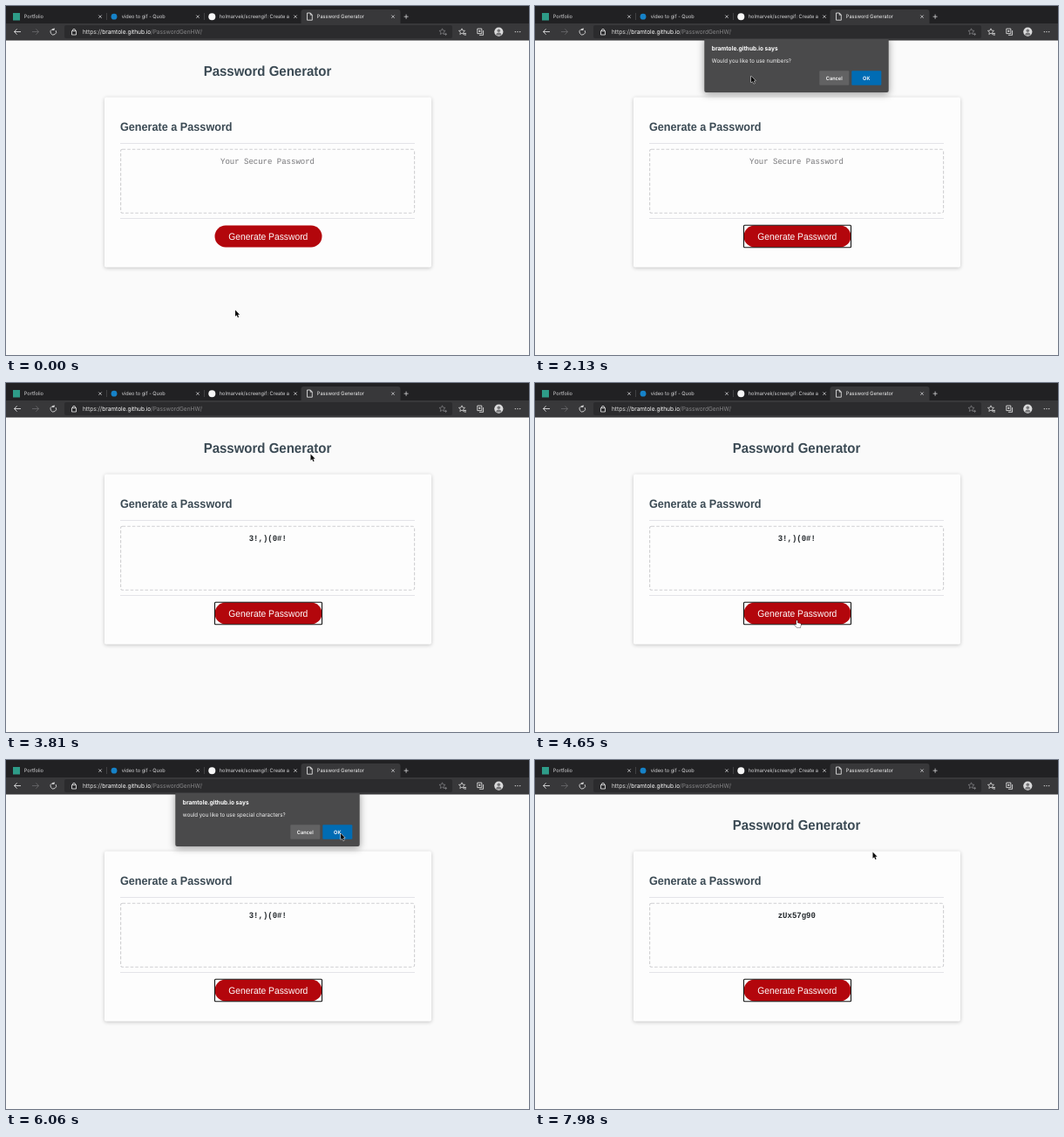
An HTML page with a canvas for the animation above (8 s loop, 600 by 400 pixels).

```html
<!DOCTYPE html>
<html lang="en">
<head>
<meta charset="utf-8">
<title>Password Generator</title>
<style>
  html, body { margin: 0; width: 100%; height: 100%; overflow: hidden; background: #fafafa; }
  canvas { display: block; width: 600px; height: 400px; }
</style>
</head>
<body>
<canvas id="stage"></canvas>
<script>
// A 1280 x 800 screen shown at 600 x 400
const SCALE = 600 / 1280;
const ASPECT = 16 / 15;
const UI = 'Inter, "Open Sans", sans-serif';
const PAGE = '"Liberation Sans", Arial, sans-serif';
const MONO = '"Liberation Mono", monospace';
const HOST = 'bramtole.github.io';
const INK = '#f0f0f0', FAINT = '#868688', SLATE = '#3b4a54';

const canvas = document.getElementById('stage');
const ctx = canvas.getContext('2d');
const ratio = window.devicePixelRatio || 1;
canvas.width = 600 * ratio;
canvas.height = 400 * ratio;

const SPOT = {
  rest: [263, 348.5], generate: [264.5, 257.5], again: [300.5, 272],
  field: [248, 80.5], ok: [384, 84], cancel: [349.5, 81.5], idle: [387.5, 105.5]
};
const ASK = {
  prompt: 'How many character would you like your password between 8 - 128',
  numbers: 'Would you like to use numbers?',
  special: 'would you like to use special characters?',
  lower: 'would you like to use Lowercase letters?',
  upper: 'would you like to use Uppercase letters?'
};

// The session is a chain of steps; in each the pointer goes to one spot.
const steps = [];
let loop = 0, spot = 'rest', result = '';

function addStep(length, target, dialog) {
  steps.push({ start: loop, length, from: SPOT[spot], to: SPOT[target], dialog, result });
  loop += length;
  spot = target;
}

function addRun(approach, button, typing, pace, answers, password) {
  addStep(approach, button);
  addStep(typing, 'field', 'prompt');
  for (const question in answers) addStep(pace, answers[question], question);
  result = password;
}

addRun(750, 'generate', 1200, 400,
  { numbers: 'ok', special: 'ok', lower: 'cancel', upper: 'cancel' }, '3!,)(0#!');
addRun(1190, 'again', 660, 450,
  { numbers: 'ok', special: 'cancel', lower: 'ok', upper: 'ok' }, 'zUx57g90');
addStep(800, 'idle');

// The pointer waits for half the step, then moves quickly and settles.
function pointerAt(step, u) {
  const k = Math.min(1, Math.max(0, (u - 0.5) / 0.2));
  const e = k * k * (3 - 2 * k);
  return step.from.map((a, i) => a + (step.to[i] - a) * e);
}

function box(x, y, w, h, r, fill, stroke, width = 1) {
  ctx.beginPath();
  ctx.roundRect(x, y, w, h, r);
  if (fill) { ctx.fillStyle = fill; ctx.fill(); }
  if (stroke) { ctx.strokeStyle = stroke; ctx.lineWidth = width; ctx.stroke(); }
}

function shadowBox(x, y, w, h, r, fill, shadow, blur, dy) {
  ctx.save();
  ctx.shadowColor = shadow;
  ctx.shadowBlur = blur * ratio;
  ctx.shadowOffsetY = dy * ratio;
  box(x, y, w, h, r, fill);
  ctx.restore();
}

function arc(x, y, r, fill, stroke, a = 0, b = Math.PI * 2) {
  ctx.beginPath();
  ctx.arc(x, y, r, a, b);
  if (fill) { ctx.fillStyle = fill; ctx.fill(); }
  if (stroke) { ctx.strokeStyle = stroke; ctx.lineWidth = 0.8; ctx.stroke(); }
}

function icon(d, x, y, stroke, fill, width = 0.8) {
  const shape = new Path2D(d);
  ctx.save();
  ctx.translate(x, y);
  ctx.lineJoin = 'round';
  ctx.lineWidth = width;
  ctx.strokeStyle = stroke;
  ctx.stroke(shape);
  if (fill) { ctx.fillStyle = fill; ctx.fill(shape); }
  ctx.restore();
}

// Size is in screen pixels; returns the right end of the text.
function text(str, x, y, size, family, color, { weight = 400, align = 'left' } = {}) {
  ctx.save();
  ctx.translate(x, y);
  ctx.scale(1, ASPECT);
  ctx.textRendering = 'geometricPrecision';
  ctx.font = `${weight} ${size * SCALE}px ${family}`;
  ctx.fillStyle = color;
  ctx.textAlign = align;
  ctx.fillText(str, 0, 0);
  const width = ctx.measureText(str).width;
  ctx.restore();
  return x + width;
}

function star(x, y, color) {
  ctx.beginPath();
  for (let i = 0; i < 10; i++) {
    const a = -Math.PI / 2 + i * Math.PI / 5, r = i % 2 ? 1.7 : 3.7;
    ctx.lineTo(x + r * Math.cos(a), y + r * Math.sin(a));
  }
  ctx.closePath();
  ctx.strokeStyle = color;
  ctx.lineWidth = 0.7;
  ctx.stroke();
}

function drawTabs() {
  const titles = ['Portfolio', 'video to gif - Quob', 'holmarvek/screengif: Create a', 'Password Generator'];
  box(338.5, 4, 114, 17, [3, 3, 0, 0], '#38383a');
  titles.forEach((title, i) => {
    const x = 112 * i;
    ctx.save();
    ctx.beginPath();
    ctx.rect(x, 4, 102, 16);
    ctx.clip();
    text(title, x + 20.8, 14.1, 12, UI, i === 3 ? INK : '#d4d4d6');
    ctx.restore();
    icon('M-1.7-1.7L1.7 1.7M1.7-1.7L-1.7 1.7', x + 108, 12.2, '#d4d4d6');
    if (i < 2) icon('M0 0V8', x + 115.5, 8, '#58585a', null, 0.6);
  });
  box(8, 8, 8, 8.5, 0, '#2e9c88');
  arc(124, 12.2, 3.4, '#1682c8');
  arc(236.3, 12.2, 4, '#f6f6f6');
  icon('M0 0H3.8L5.8 2.2V8.2H0ZM3.8 0V2.2H5.8', 345.5, 8, INK);
  icon('M-2.5 0H2.5M0-2.6V2.6', 459.1, 12.2, '#d4d4d6');
}

function drawToolbar() {
  const y = 29.5;
  box(67, 22, 445, 15, 2, '#2b2b2d');
  icon('M7.5 0H0M3.1-3.2L0 0L3.1 3.2', 9.5, y, INK);
  icon('M0 0H7.5M4.4-3.2L7.5 0L4.4 3.2', 30, y, '#6a6a6c');
  arc(54.3, 29.7, 3.3, null, INK, -0.5, Math.PI * 1.6);
  icon('M0 0V2H-2.2', 55.2, 25.4, INK);
  icon('M-2.5-.9H2.5V3.5H-2.5ZM-1.6-.9V-1.5A1.6 1.6 0 0 1 1.6-1.5V-.9', 78, y, INK);

  let x = text('https://', 88, 31.8, 14, UI, '#dcdcdc');
  x = text(HOST, x, 31.8, 14, UI, '#fbfbfb');
  text('/PasswordGenHW/', x, 31.8, 14, UI, FAINT);

  star(500.5, y, FAINT);
  icon('M-1.5 0H1.5M0-1.5V1.5', 504.5, 32.3, FAINT);
  star(523, y, INK);
  icon('M0 0H3M.5 1.6H3', 525, 31.4, INK);
  icon('M0 0H5V5.6H0ZM2.2 7.3H6.8V2M2.5 1.6V4M1.3 2.8H3.7', 540.8, 26, INK);
  arc(565.3, 29.6, 5.1, '#dadadb');
  arc(565.3, 28.3, 1.8, '#757577');
  arc(565.3, 33.6, 3.1, '#757577', null, Math.PI, 0);
  for (const dx of [-2.7, 0, 2.7]) arc(587 + dx, 29.6, 0.65, INK);
}

function drawBrowser() {
  box(0, 0, 600, 39.5, 0, '#38383a');
  box(0, 0, 600, 20, 0, '#212123');
  drawTabs();
  drawToolbar();
}

function drawPage(password, focused) {
  const center = { align: 'center' };
  box(0, 39, 600, 361, 0, '#fafafa');
  text('Password Generator', 300, 80.2, 32, PAGE, SLATE, { weight: 700, align: 'center' });
  shadowBox(113, 104.5, 375, 195, 2, '#fdfdfd', 'rgba(0,0,0,0.22)', 4, 1);
  text('Generate a Password', 131, 143.4, 27, PAGE, SLATE, { weight: 700 });
  for (const y of [157.5, 243.5]) icon('M0 0H338', 131, y, '#e4e4e8', null, 1);

  ctx.setLineDash([3.6, 2]);
  box(131.6, 164.3, 337, 73, 2, null, '#cfcfd2', 1.1);
  ctx.setLineDash([]);
  if (password) text(password, 300.3, 180.8, 19.2, MONO, '#252a2e', { weight: 700, align: 'center' });
  else text('Your Secure Password', 300, 180.8, 19.2, MONO, '#77777a', center);

  box(239.5, 251.5, 123, 25, 12.5, '#b3060c');
  text('Generate Password', 300.8, 268, 22, PAGE, '#ffffff', center);
  if (focused) box(239.5, 251.3, 123, 25.4, 1, null, '#141414', 1.1);
}

function drawDialog(kind, entry, px) {
  const prompt = kind === 'prompt';
  const bottom = prompt ? 126 : 99, top = bottom - 24.8;
  const label = { weight: 600, align: 'center' };
  ctx.save();
  ctx.beginPath();
  ctx.rect(0, 38, 600, 362);
  ctx.clip();
  shadowBox(194.3, 36, 211.4, bottom - 36, 2, '#4a4a4b', 'rgba(0,0,0,0.4)', 9, 2);
  ctx.restore();
  text(HOST + ' says', 202.8, 51.4, 14, UI, '#ffffff', { weight: 700 });
  text(ASK[kind], 202.8, 65, 13, UI, '#f4f4f4');
  if (prompt) {
    box(203, 71.5, 194, 12.5, 1, '#3b3b3c', '#a2a2a2', 0.9);
    text(entry, 206, 80.1, 13, UI, '#f8f8f8');
  }
  const hover = !prompt && px > 326 && px < 360;
  box(326.3, top, 34, 16.5, 1, hover ? '#767677' : '#626263');
  box(363.3, top, 34, 16.5, 1, '#006cb4');
  text('Cancel', 343.2, top + 10.4, 12, UI, '#f8f8f8', label);
  text('OK', 380.2, top + 10.4, 12, UI, '#ffffff', label);
}

function drawPointer(x, y, hand) {
  if (hand) {
    icon('M-.7 .4Q0-.5 .7 .4V3L4 3.8Q4.6 4 4.5 4.8L3.9 8.4H-.2L-2.4 5.3Q-2.2 4.3-.7 5.2Z',
      x, y, '#141414', '#fdfdfd');
  } else {
    icon('M0 0V7.2L1.7 5.7L2.9 8.5L4.1 8L2.9 5.2H5.1Z', x, y, '#f6f6f6', '#0a0a0a', 1);
  }
}

function draw(t) {
  const step = steps.findLast(s => s.start <= t);
  const u = (t - step.start) / step.length;
  const [x, y] = pointerAt(step, u);
  const overButton = x > 239 && x < 363 && y > 251 && y < 277;
  ctx.setTransform(ratio, 0, 0, ratio, 0, 0);
  drawPage(step.result, step !== steps[0]);
  drawBrowser();
  if (step.dialog) drawDialog(step.dialog, u > 0.8 ? '8' : '', x);
  drawPointer(x, y, overButton && !step.dialog);
}

const start = performance.now();
function tick() {
  draw((performance.now() - start) % loop);
  requestAnimationFrame(tick);
}
tick();
</script>
</body>
</html>
```
